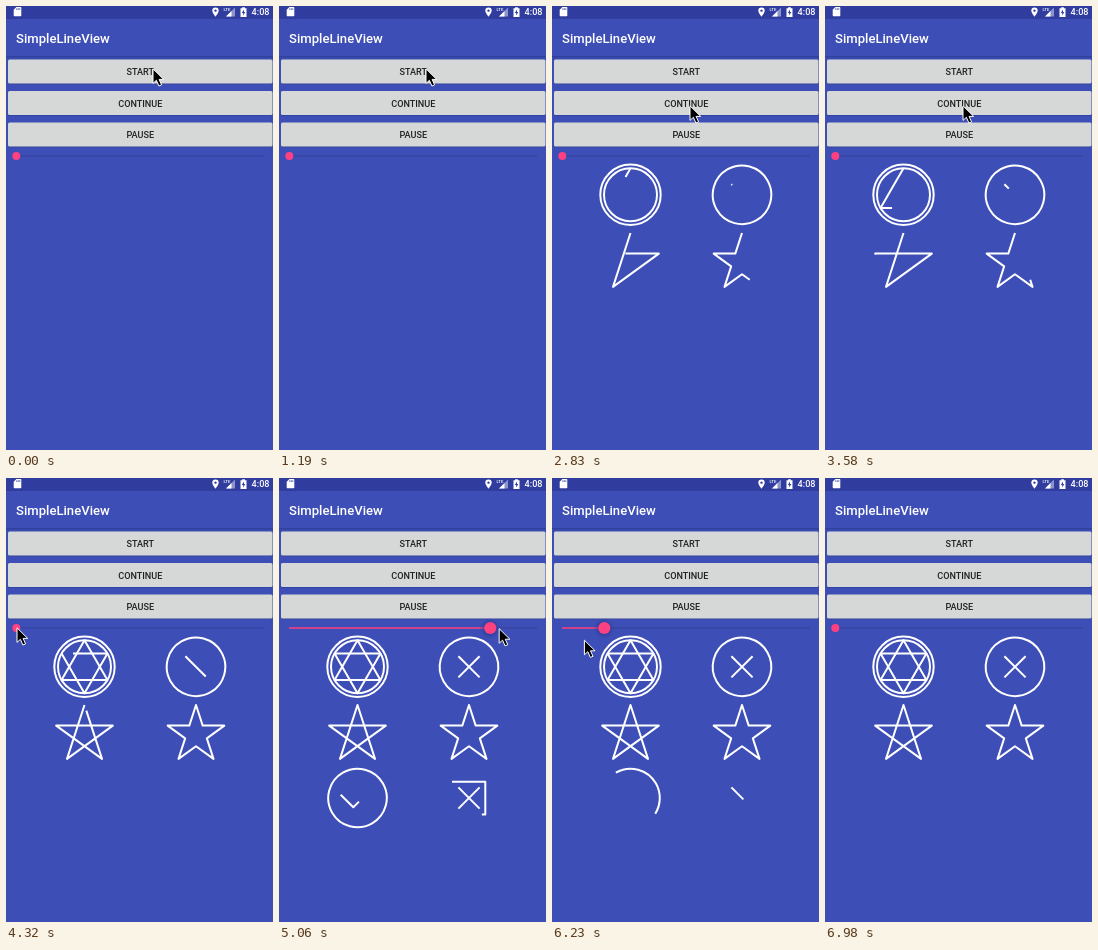
Recreate the animation shown at these times as an HTML page. Size 267 px wide and 444 px high, loop 7280 ms.

```html
<!DOCTYPE html>
<html lang="en">
<head>
<meta charset="utf-8">
<title>SimpleLineView</title>
<style>
  html, body { margin: 0; width: 100%; height: 100%; overflow: hidden; background: #3d4eb6; }
  svg { display: block; width: 100%; height: 100%; }
  text { font-family: Roboto, sans-serif; font-weight: 500; }
  .label { font-size: 9.1px; fill: #202020; text-anchor: middle; }
  .lines path { fill: none; stroke: #fff; stroke-width: 2; stroke-linejoin: round; }
</style>
</head>
<body>
<svg viewBox="0 0 267 444" preserveAspectRatio="none">
  <defs>
    <linearGradient id="shade" x2="0" y2="1">
      <stop stop-color="#1c2870" stop-opacity=".4"/>
      <stop offset="1" stop-color="#1c2870" stop-opacity="0"/>
    </linearGradient>
    <radialGradient id="glow">
      <stop offset=".5" stop-color="#2b378c" stop-opacity=".6"/>
      <stop offset="1" stop-color="#2b378c" stop-opacity="0"/>
    </radialGradient>
  </defs>
  <rect width="267" height="444" fill="#3d4eb6"/>
  <rect width="267" height="13" fill="#303d9f"/>
  <rect y="50" width="267" height="3" fill="url(#shade)"/>

  <g fill="#fff">
    <path d="M10.4 1H14.6Q15.3 1 15.3 1.7V9.6Q15.3 10.3 14.6 10.3H8.4Q7.7 10.3 7.7 9.6V3.7Z"/>
    <path d="M10.8 2.2V4M12.3 2.2V4M13.8 2.2V4" stroke="#303d9f" stroke-width=".7"/>
    <path fill-rule="evenodd" d="M209.5 1.4a3.2 3.2 0 0 1 3.2 3.2c0 2.3-3.2 6.2-3.2 6.2s-3.2-3.9-3.2-6.2a3.2 3.2 0 0 1 3.2-3.2Zm0 2a1.2 1.2 0 1 0 .01 0Z"/>
    <path opacity=".45" d="M229 1.5V10.5H220Z"/>
    <path d="M225.5 5V10.5H220Z"/>
    <text x="217.4" y="5" font-size="4.4">LTE</text>
    <path fill-rule="evenodd" d="M236.2 1.3h2.6v1h1.7v8.6h-6v-8.6h1.7ZM238 3.6l-2.2 3.4h1.4v2.6l2.1-3.5H238Z"/>
    <text x="245.6" y="9.4" font-size="9.1">4:08</text>
    <text x="10" y="36.6" font-size="13.1">SimpleLineView</text>
  </g>

  <g id="buttons"></g>

  <path d="M10 150H258" stroke="#34419a"/>
  <path id="filled" stroke="#ff4081" stroke-width="1.4"/>
  <circle id="halo" cy="150.6" r="10.5" fill="url(#glow)"/>
  <circle id="thumb" cy="150" fill="#ff4081"/>

  <g id="lines" class="lines"></g>

  <path id="cursor" d="M1 1.8V16.4L4.4 13.3 6.9 19 9.6 17.9 7.1 12.4H11.7Z" fill="#000" stroke="#fff"/>
</svg>
<script>
const LOOP = 7280, FIRST_MOVE = 1190, TICK = 148.5;
const byId = id => document.getElementById(id);
const clamp = (v, low = 0, high = 1) => Math.min(high, Math.max(low, v));
const phase = (v, from, to) => clamp((v - from) / (to - from));

function show(node, attrs) {
  for (const key in attrs) node.setAttribute(key, attrs[key]);
  return node;
}

function add(parent, tag, attrs, text = '') {
  const node = document.createElementNS('http://www.w3.org/2000/svg', tag);
  node.textContent = text;
  return parent.appendChild(show(node, attrs));
}

function polar(cx, cy, r, deg) {
  const a = deg * Math.PI / 180;
  return `${cx + r * Math.cos(a)} ${cy + r * Math.sin(a)}`;
}

function circle(cx, cy, r, start, sweep = 1) {
  const arc = deg => `A${r} ${r} 0 0 ${sweep} ${polar(cx, cy, r, deg)}`;
  return `M${polar(cx, cy, r, start)}${arc(start + 180)}${arc(start)}`;
}

function polygon(cx, cy, count, turn, radii, start = -90) {
  const points = Array.from({ length: count }, (_, i) =>
    polar(cx, cy, radii[i % radii.length], start - i * turn));
  return `M${points.join('L')}Z`;
}

['START', 'CONTINUE', 'PAUSE'].forEach((name, i) => {
  const y = 53.5 + i * 31.5, group = byId('buttons');
  add(group, 'rect', { x: 2, y: y + .7, width: 264.5, height: 24, rx: 1.5, fill: '#2b3681', opacity: .6 });
  add(group, 'rect', { x: 2, y, width: 264.5, height: 24, rx: 1.5, fill: '#d6d7d7' });
  add(group, 'text', { x: 134.3, y: y + 15.6, class: 'label' }, name);
});

// Each stroke: geometry and the drawn share for a state { play, seek, tick }.
const LEFT = 78.5, RIGHT = 190, ROW1 = 188.8, ROW2 = 256.8, ROW3 = 320;
const slash = (cy, dir) => `M${RIGHT - 10.6 * dir} ${cy - 10.6}l${21.2 * dir} 21.2`;
const firstHalf = s => phase(s.play, 0, .5);
const lastHalf = s => phase(s.play, .5, 1);
const strokes = [
  [circle(LEFT, ROW1, 30.2, 90), firstHalf],
  [circle(LEFT, ROW1, 26.5, 90, 0), firstHalf],
  [polygon(LEFT, ROW1, 3, 120, [26.5]), s => lastHalf(s) * 2],
  [polygon(LEFT, ROW1, 3, 120, [26.5], -150), s => lastHalf(s) * 2 - 1],
  [circle(RIGHT, ROW1, 29.3, -120), firstHalf],
  [slash(ROW1, 1), lastHalf],
  [slash(ROW1, -1), s => phase(s.tick, 21, 24)],
  [polygon(LEFT, ROW2, 5, 144, [29.8]), s => s.play],
  [polygon(RIGHT, ROW2, 10, 36, [29.8, 11.4]), s => s.play * 1.05],
  [circle(LEFT, ROW3, 29.3, -120), s => phase(s.seek, 0, .4)],
  ['M61.7 316.7l12.6 12.6 20.7-20.7', s => phase(s.seek, .58, 1)],
  [slash(ROW3, 1), s => phase(s.seek, 0, .3)],
  [slash(ROW3, -1), s => phase(s.seek, .3, .6)],
  ['M173 303.8h33.3v32.6h-33.3Z', s => phase(s.seek, .6, 1)],
].map(([d, share]) => ({ share, node: add(byId('lines'), 'path', { d, pathLength: 1 }) }));

// Runs after START, rests after PAUSE, finishes after CONTINUE.
const SPEED = .075, PAUSED_AT = .518;
const playAt = tick => clamp(
  clamp(SPEED * (tick - .4), 0, PAUSED_AT) + Math.max(0, SPEED * (tick - 14.85)));

// Dragged to the right end, then back.
const thumbAt = tick => clamp(Math.min(45 + 41.5 * (tick - 22), 52 + 58 * (34 - tick)), 10, 258);

// Stops of the pointer: tick, x, y.
const stops = [
  [1, 146, 61], [4, 136, 118], [7, 136, 118], [11, 137, 98], [16, 137, 98],
  [21, 10, 148], [27, 261, 149], [30, 261, 150], [35, -26, 163], [38, 250, 416], [39, 300, 460],
];

function pointerAt(tick) {
  const next = stops.findIndex(stop => stop[0] > tick);
  if (next < 1) return stops.at(next).slice(1);
  const [from, ...a] = stops[next - 1], [to, ...b] = stops[next];
  return a.map((v, i) => v + (b[i] - v) * phase(tick, from, to));
}

function render(time) {
  // Poses are held for one tick, like a slow screen capture.
  const tick = Math.floor((time - FIRST_MOVE) / TICK + .1);
  const x = thumbAt(tick);
  const dragging = x > 10;
  const state = { tick, play: playAt(tick), seek: (x - 10) / 248 };

  for (const { node, share } of strokes) {
    const part = share(state);
    show(node, {
      visibility: part > 0 ? 'visible' : 'hidden',
      'stroke-dasharray': part < 1 ? `${Math.max(part, 0)} 2` : 'none',
    });
  }
  show(byId('filled'), { d: `M10 150H${x}` });
  show(byId('thumb'), { cx: x + .3, r: dragging ? 6.1 : 4 });
  show(byId('halo'), { cx: x, visibility: dragging ? 'visible' : 'hidden' });
  show(byId('cursor'), { transform: `translate(${pointerAt(tick)})` });
}

const begin = performance.now();
function frame() {
  render((performance.now() - begin) % LOOP);
  requestAnimationFrame(frame);
}
frame();
</script>
</body>
</html>
```
